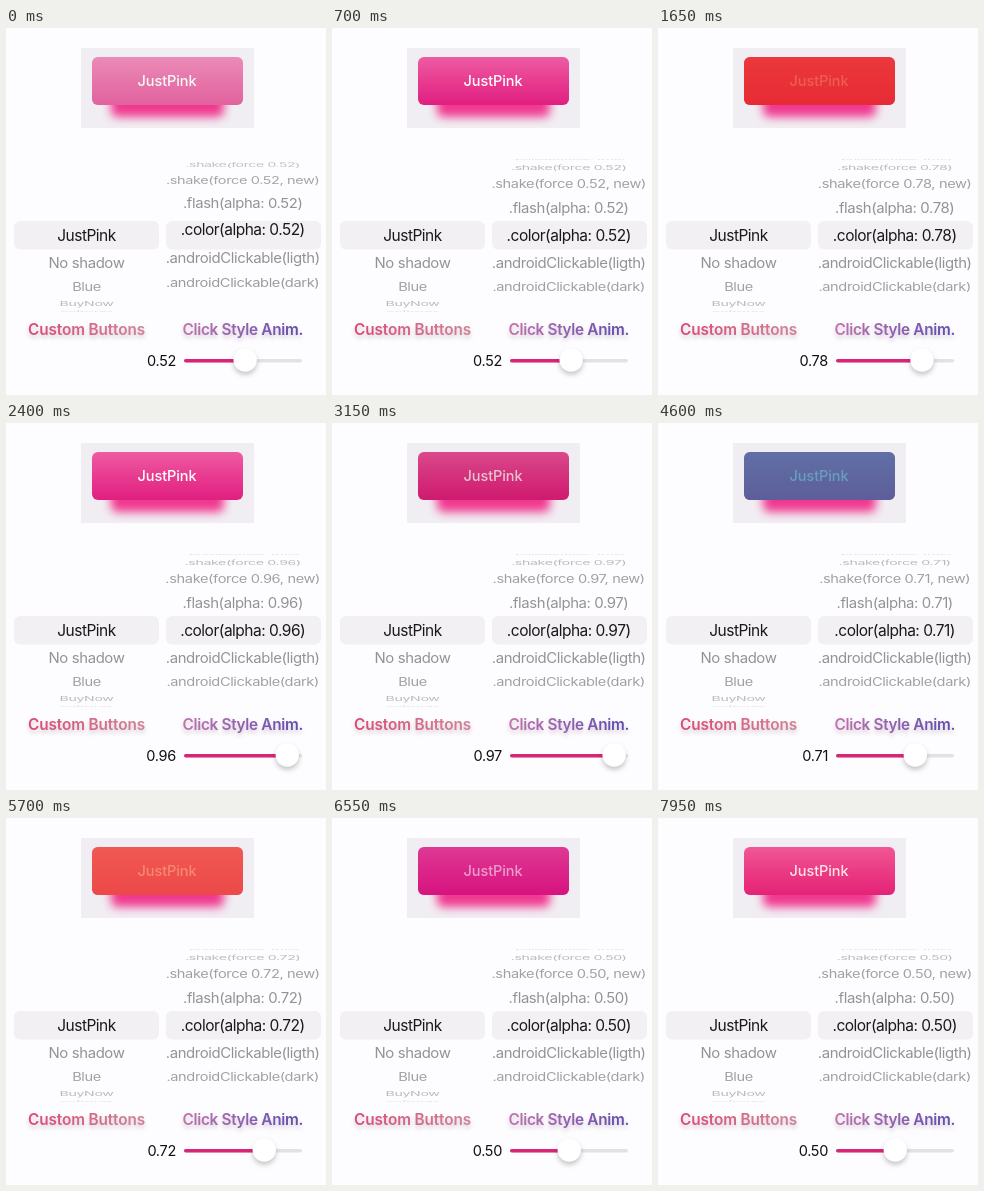
An HTML page that plays this animation: 320x367 px, repeating every 8000 ms.

```html
<!DOCTYPE html>
<html lang="en">
<head>
<meta charset="utf-8">
<title>Custom buttons</title>
<style>
  html, body { margin: 0; width: 100%; height: 100%; overflow: hidden; background: #fdfcfe; }
  svg { display: block; width: 100%; height: 100%; }
  filter { color-interpolation-filters: sRGB; }
  text { font-family: Inter, Roboto, sans-serif; font-size: 15px; letter-spacing: -.38px; text-anchor: middle; fill: #939297; }
  .selected { font-size: 15.5px; letter-spacing: -.5px; fill: #19191b; }
  .title { font-size: 15.3px; font-weight: 600; letter-spacing: -.3px; }
  .wide { letter-spacing: -.1px; }
  .label { font-size: 14.5px; font-weight: 500; letter-spacing: -.1px; fill: #fff; }
  #value { font-size: 14.5px; letter-spacing: -.3px; text-anchor: end; fill: #111; }
</style>
</head>
<body>
<svg viewBox="0 0 320 367">
  <defs>
    <linearGradient id="pink" x2="0" y2="1">
      <stop stop-color="#ed5ca3"/><stop offset=".5" stop-color="#e83b90"/><stop offset="1" stop-color="#e01f80"/>
    </linearGradient>
    <linearGradient id="rose"><stop stop-color="#db4a74"/><stop offset="1" stop-color="#d08496"/></linearGradient>
    <linearGradient id="violet"><stop stop-color="#c274ae"/><stop offset="1" stop-color="#5d4db0"/></linearGradient>
    <filter id="glow" x="-30%" y="-60%" width="160%" height="220%"><feGaussianBlur stdDeviation="5"/></filter>
    <filter id="titleShadow" x="-10%" y="-50%" width="120%" height="220%">
      <feDropShadow dx="0" dy="3" stdDeviation="2" flood-color="#806080" flood-opacity=".3"/>
    </filter>
    <filter id="thumbShadow" x="-50%" y="-50%" width="200%" height="200%">
      <feDropShadow dx="0" dy="3" stdDeviation="2.8" flood-color="#000" flood-opacity=".22"/>
    </filter>
    <clipPath id="panel"><rect x="75" y="20" width="173" height="80"/></clipPath>
  </defs>

  <rect x="75" y="20" width="173" height="80" fill="#f1eef3"/>
  <g clip-path="url(#panel)">
    <rect x="105" y="50" width="113" height="39" rx="6" fill="#f0388f" filter="url(#glow)"/>
  </g>
  <rect x="86" y="29" width="151" height="48" rx="6" fill="url(#pink)"/>
  <text class="label" x="161" y="58.4" style="fill:#fff">JustPink</text>
  <rect id="tint" x="86" y="29" width="151" height="48" rx="6" opacity="0"/>

  <g fill="#f3f0f3">
    <rect x="8" y="193" width="145" height="28.5" rx="6"/>
    <rect x="160" y="193" width="155" height="28.5" rx="6"/>
  </g>
  <g id="wheels"></g>

  <text class="title wide" x="80.5" y="306.5" style="fill:url(#rose)" filter="url(#titleShadow)">Custom Buttons</text>
  <text class="title" x="236.8" y="306.5" style="fill:url(#violet)" filter="url(#titleShadow)">Click Style Anim.</text>

  <text id="value" x="170" y="337.7"></text>
  <rect x="178" y="331" width="118" height="3.5" rx="1.75" fill="#e3e1e5"/>
  <rect id="fill" x="178" y="331" height="3.5" rx="1.75" fill="#da2478"/>
  <circle id="thumb" cy="332" r="11.7" fill="#fff" filter="url(#thumbShadow)"/>
</svg>
<script>
const LOOP = 8000, RADIUS = 76, STEP = 21.3, CENTER = 207.7;
const $ = id => document.getElementById(id);
const clamp = x => Math.min(1, Math.max(0, x));
const smooth = x => x * x * (3 - 2 * x);

// Drags of the slider: start, end, value reached
const drags = [[850, 1400, .78], [1750, 2500, .97], [3500, 4200, .71], [5200, 5300, .72], [5880, 6300, .5]];
// Taps on the button: time, tint, slider value at that time
const taps = [
  [-250, '#e4f0e0', .52], [1550, '#e92f20', .78], [2700, '#96103c', .97], [4500, '#2878a6', .71],
  [5600, '#f15a34', .72], [6360, '#c4007d', .5], [7520, '#fa3c3c', .5]
];

function makeWheel(x, labels) {
  return labels.map(([slot, label]) => {
    const node = document.createElementNS('http://www.w3.org/2000/svg', 'text');
    node.setAttribute('y', 5.4);
    if (!slot) node.setAttribute('class', 'selected');
    $('wheels').append(node);
    return { x, slot, label, node };
  });
}
const left = makeWheel(80.5, [[0, 'JustPink'], [1, 'No shadow'], [2, 'Blue'], [3, 'BuyNow'], [4, 'SoftGray']]);
const right = makeWheel(236.7, [
  [-4, '.pulsate(new: true)'], [-3, '.shake(force #)'], [-2, '.shake(force #, new)'],
  [-1, '.flash(alpha: #)'], [0, '.color(alpha: #)'],
  [1, '.androidClickable(ligth)'], [2, '.androidClickable(dark)']
]);

function drawWheel(rows, turn, value) {
  for (const { x, slot, label, node } of rows) {
    const angle = (slot * STEP - turn) * Math.PI / 180;
    const squash = Math.max(0, Math.cos(angle));
    const y = CENTER + RADIUS * Math.sin(angle);
    const perspective = .9 + .1 * squash;
    node.textContent = label.replace('#', value);
    node.setAttribute('transform', `translate(${x} ${y}) scale(${perspective} ${squash})`);
    node.setAttribute('opacity', slot ? clamp(.25 + squash * .85) : 1);
  }
}

function sliderAt(t) {
  let value = .52;
  for (const [start, end, goal] of drags) value += (goal - value) * smooth(clamp((t - start) / (end - start)));
  return value;
}

function drawTint(t) {
  const [time, color, alpha] = taps.findLast(([start]) => start <= t);
  const age = t - time;
  const strength = age < 100 ? age / 100 : (1 - clamp((age - 100) / 700)) ** 2;
  $('tint').setAttribute('fill', color);
  $('tint').setAttribute('opacity', alpha * strength);
}

const origin = performance.now();
function draw(now) {
  const t = Math.max(0, now - origin) % LOOP;
  const value = sliderAt(t), text = value.toFixed(2);
  const thumbX = 189.5 + 95.5 * value;
  drawWheel(left, 0, text);
  drawWheel(right, 4.5 * (1 - clamp(t / 500)) ** 3, text);
  drawTint(t);
  $('value').textContent = text;
  $('fill').setAttribute('width', thumbX - 178);
  $('thumb').setAttribute('cx', thumbX);
  requestAnimationFrame(draw);
}
draw(origin);
</script>
</body>
</html>
```
